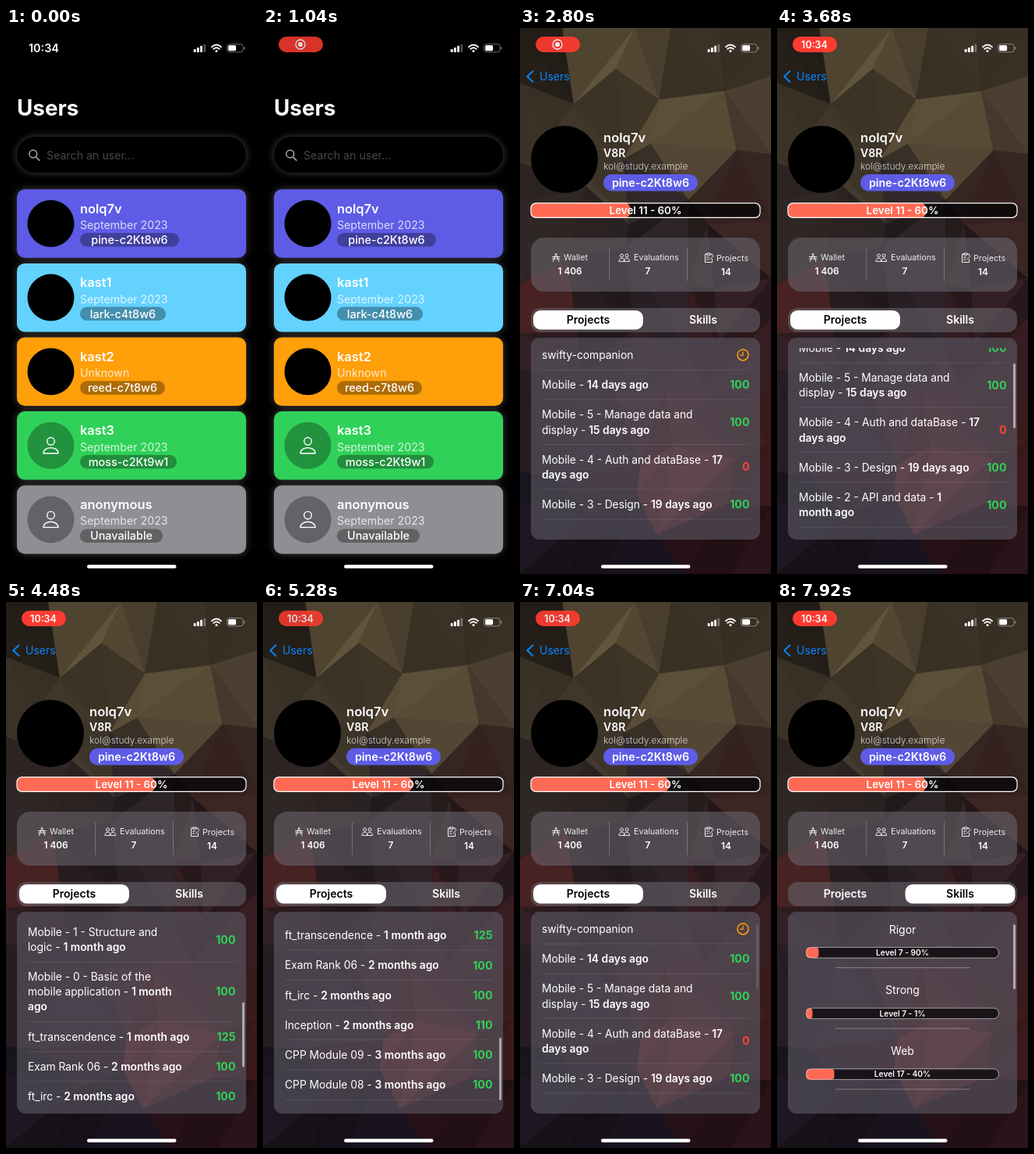
Recreate the animation shown at these times as an HTML page. Size 322 px wide and 698 px high, loop 8 s.

```html
<!DOCTYPE html>
<html lang="en">
<meta charset="utf-8">
<title>Users</title>
<style>
html, body { margin: 0; height: 100%; overflow: hidden; background: #000; }
svg { display: block; width: 322px; height: 698px; font-family: Inter, Roboto, sans-serif; white-space: pre; }
.glow { filter: drop-shadow(0 0 5px rgba(255, 235, 245, .27)); }
</style>
<svg id="stage" viewBox="0 0 322 698"></svg>
<script>
const LOOP = 8000, W = 322, H = 698, SCROLL = 412;
const GREEN = '#30d158', RED = '#ff453a', ORANGE = '#ff9f0a', BLUE = '#0a84ff', INDIGO = '#5e5ce6';

const text = (x, y, size, weight, fill, str, anchor = 'start', more = '') =>
  `<text x="${x}" y="${y}" font-size="${size}" font-weight="${weight}" fill="${fill}" text-anchor="${anchor}" ${more}>${str}</text>`;
const rect = (x, y, w, h, r, fill, more = '') =>
  `<rect x="${x}" y="${y}" width="${w}" height="${h}" rx="${r}" fill="${fill}" ${more}/>`;
const circle = (x, y, r, fill, more = '') => `<circle cx="${x}" cy="${y}" r="${r}" fill="${fill}" ${more}/>`;
const line = (d, color = '#fff', width = 1, more = '') =>
  `<path d="${d}" fill="none" stroke="${color}" stroke-width="${width}" stroke-linecap="round" stroke-linejoin="round" ${more}/>`;

// Users list
const users = [
  ['nolq7v', 'September 2023', 'pine-c2Kt8w6', 127, INDIGO],
  ['kast1', 'September 2023', 'lark-c4t8w6', 110, '#64d2ff'],
  ['kast2', 'Unknown', 'reed-c7t8w6', 109, ORANGE],
  ['kast3', 'September 2023', 'moss-c2Kt9w1', 124, GREEN, true],
  ['anonymous', 'September 2023', 'Unavailable', 106, '#8e8e93', true]
];
const userCard = ([name, date, place, w, color, plain], i) =>
  `<g transform="translate(0 ${i * 94.6})">` +
  rect(14, 206.3, 294, 87.5, 10, color, 'class="glow"') +
  circle(57.5, 250, 30, plain ? 'rgba(0,0,0,.3)' : '#000') +
  (plain ? circle(57.5, 244.5, 4.8, 'none', 'stroke="#fff" stroke-width="1.4"') +
    line('M48 260C48 250.5 67 250.5 67 260Z', '#fff', 1.4) : '') +
  text(95, 236.5, 16.4, 600, '#fff', name) +
  text(95, 257, 14.2, 400, 'rgba(255,255,255,.78)', date) +
  rect(95, 262, w, 17.5, 8.75, 'rgba(0,0,0,.32)') +
  text(95 + w / 2, 276, 14.4, 500, '#fff', place, 'middle') + '</g>';

const listPage = rect(0, 0, W, H, 0, '#000') +
  rect(14, 139, 294, 46, 23, '#000', 'class="glow"') +
  circle(34.8, 161, 4.9, 'none', 'stroke="#98989d" stroke-width="1.7"') + line('M38.5 164.8l4.3 4.3', '#98989d', 1.9) +
  text(52, 167.5, 14.2, 400, '#48464a', 'Search an user...') +
  users.map(userCard).join('');

// Faceted backdrop: jittered triangles tinted by nearby colour anchors
const anchors = ('20,20,29241c 100,30,574b34 165,60,443a2a 250,30,352d23 300,70,40362a 200,115,5c4f38 290,135,483c2f ' +
  '40,110,382f25 85,140,40372a 20,240,2b2422 160,250,272122 300,230,3a2523 15,340,3c1d1d 150,345,241c20 300,340,2a1a1e ' +
  '60,480,241a21 260,430,361b20 200,580,561f23 300,520,351819 20,600,1a141d 160,685,15101a 300,680,2a1419')
  .split(' ').map(s => {
    const [x, y, c] = s.split(',');
    return [+x, +y, [0, 2, 4].map(i => parseInt(c.substr(i, 2), 16))];
  });
let seed = 11;
const rnd = () => (seed = seed * 16807 % 2147483647) / 2147483647;
function facet(pts) {
  const cx = (pts[0][0] + pts[1][0] + pts[2][0]) / 3, cy = (pts[0][1] + pts[1][1] + pts[2][1]) / 3;
  const sum = [0, 0, 0], light = .78 + .44 * rnd();
  let total = 0;
  for (const [x, y, rgb] of anchors) {
    const k = 1 / (((x - cx) ** 2 + (y - cy) ** 2) ** 2 + 1);
    total += k;
    rgb.forEach((v, i) => sum[i] += v * k);
  }
  const fill = `rgb(${sum.map(v => Math.round(v / total * light))})`;
  return `<polygon points="${pts.join(' ')}" fill="${fill}" stroke="${fill}" stroke-width=".6"/>`;
}
function backdrop() {
  const nx = 5, ny = 9, grid = [];
  for (let j = 0; j <= ny; j++) {
    grid.push([]);
    for (let i = 0; i <= nx; i++) {
      const dx = (rnd() - .5) * 52, dy = (rnd() - .5) * 60;
      grid[j].push([i * W / nx + (i % nx ? dx : 0), j * H / ny + (j % ny ? dy : 0)]);
    }
  }
  let out = rect(0, 0, W, H, 0, '#1c171b');
  for (let j = 0; j < ny; j++) for (let i = 0; i < nx; i++) {
    const a = grid[j][i], b = grid[j][i + 1], c = grid[j + 1][i + 1], d = grid[j + 1][i];
    out += rnd() < .5 ? facet([a, b, c]) + facet([a, c, d]) : facet([a, b, d]) + facet([b, c, d]);
  }
  return out;
}

// Project rows: lines of [plain, bold], then the mark
const projects = [
  [[['swifty-companion', '']], ''],
  [[['Mobile - ', '14 days ago']], 100],
  [[['Mobile - 5 - Manage data and', ''], ['display - ', '15 days ago']], 100],
  [[['Mobile - 4 - Auth and dataBase - ', '17'], ['', 'days ago']], 0],
  [[['Mobile - 3 - Design - ', '19 days ago']], 100],
  [[['Mobile - 2 - API and data - ', '1'], ['', 'month ago']], 100],
  [[['Mobile - 1 - Structure and', ''], ['logic - ', '1 month ago']], 100],
  [[['Mobile - 0 - Basic of the', ''], ['mobile application - ', '1 month'], ['', 'ago']], 100],
  [[['ft_transcendence - ', '1 month ago']], 125],
  [[['Exam Rank 06 - ', '2 months ago']], 100],
  [[['ft_irc - ', '2 months ago']], 100],
  [[['Inception - ', '2 months ago']], 110],
  [[['CPP Module 09 - ', '3 months ago']], 100],
  [[['CPP Module 08 - ', '3 months ago']], 100]
];
function projectRows() {
  let y = 398.8, out = '';
  for (const [lines, mark] of projects) {
    const h = 19.1 * (lines.length + 1), mid = y + h / 2;
    lines.forEach(([plain, bold], i) => {
      out += text(28, y + 24.2 + i * 19.1, 13.8, 400, '#fff', `${plain}<tspan font-weight="600">${bold}</tspan>`);
    });
    out += mark === ''
      ? circle(286, mid, 7, 'none', `stroke="${ORANGE}" stroke-width="1.5"`) + line(`M286 ${mid - 4}v4.5h-3.5`, ORANGE, 1.3)
      : text(294.5, mid + 5.2, 14.2, 700, mark ? GREEN : RED, mark, 'end');
    y += h;
    out += line(`M28 ${y}H294`, 'rgba(255,255,255,.12)', .8);
  }
  return out;
}

const skills = [['Rigor', 'Level 7 - 90%', 16], ['Strong', 'Level 7 - 1%', 8], ['Web', 'Level 17 - 40%', 36]];
const skillRow = ([name, level], i) =>
  `<g transform="translate(0 ${i * 77.7})">` +
  text(161, 423.5, 14, 400, '#fff', name, 'middle') +
  rect(37.5, 441.5, 247, 13.5, 6.75, 'rgba(14,10,14,.82)') +
  rect(37.5, 441.5, 8, 13.5, 4, '#ff6a55', 'class="skill"') +
  rect(37.5, 441.5, 247, 13.5, 6.75, 'none', 'stroke="rgba(255,255,255,.6)" stroke-width=".9"') +
  text(161, 451.9, 10.2, 600, '#fff', level, 'middle') +
  line('M75 467.5H247', 'rgba(255,255,255,.4)', .8) + '</g>';

const person = (x, s) => circle(x, 291, 2 * s, 'none', 'stroke="#fff" stroke-width=".9"') +
  line(`M${x - 3.6 * s} 298c0 -5 ${7.2 * s} -5 ${7.2 * s} 0z`, '#fff', .9);
const stat = (x, mid, y, label, value) => text(x, y, 10.7, 400, 'rgba(255,255,255,.9)', label) +
  text(mid, y + 18, 11.8, 600, '#fff', value, 'middle');

const profilePage = backdrop() +
  circle(57, 168, 43, '#000') +
  text(107, 146, 16.6, 600, '#fff', 'nolq7v') +
  text(107, 165, 14, 600, '#fff', 'V8R') +
  text(107, 180.5, 12, 300, 'rgba(255,255,255,.78)', 'kol@study.example') +
  rect(107, 187, 121, 21.5, 10.75, INDIGO) + text(167.5, 203, 14.3, 600, '#fff', 'pine-c2Kt8w6', 'middle') +
  rect(14, 223.8, 294, 18.6, 6.5, 'rgba(8,5,8,.8)') +
  rect(14, 223.8, 9, 18.6, 4.5, '#ff6a55', 'id="level"') +
  rect(14, 223.8, 294, 18.6, 6.5, 'none', 'stroke="#fff" stroke-width="1.2"') +
  text(161, 238, 13.4, 600, '#fff', 'Level 11 - 60%', 'middle') +
  rect(14, 268, 294, 69, 17, 'rgba(108,104,112,.56)') +
  line('M114.5 281.5V323M214.5 281.5V323', 'rgba(255,255,255,.22)') +
  line('M42.5 298.5l3.7 -10.5 3.7 10.5M41.5 292.5h9.4M41.5 295h9.4', '#fff', .9) +
  person(130.5, 1) + person(137, 1) +
  line('M240 289h-2.5v10.5h9v-4M240 288h4v2.2h-4zM244 289h2.5v1.5M239.5 293h3M239.5 296h2M243.5 296l5 -5', '#fff', .9) +
  stat(56, 64, 297, 'Wallet', '1 406') + stat(146, 164, 297, 'Evaluations', '7') + stat(252, 264.5, 297.5, 'Projects', '14') +
  rect(14, 358, 294, 31, 12, 'rgba(104,100,108,.58)') +
  rect(17, 361, 141, 24.5, 9.5, '#fff', 'id="thumb"') +
  text(87.5, 378.3, 14, 600, '#000', 'Projects', 'middle', 'id="tab0"') +
  text(235, 378.3, 14, 600, '#fff', 'Skills', 'middle', 'id="tab1"') +
  rect(14, 396, 294, 258, 11, 'rgba(92,89,100,.62)') +
  `<g clip-path="url(#view)"><g id="rows">${projectRows()}</g></g>` +
  `<g id="skills">${skills.map(skillRow).join('')}</g>` +
  rect(303, 412, 3, 83, 1.5, 'rgba(255,255,255,.55)', 'id="bar"');

const statusBar =
  text(48.5, 31, 14.4, 600, '#fff', '10:34', 'middle', 'id="clock"') +
  '<g id="pill">' + rect(20, 11, 57, 20, 10, '#ff3b30') +
  `<g id="rec">${circle(48, 21, 6, 'none', 'stroke="#fff" stroke-width="1.3"')}${circle(48, 21, 3, '#fff')}</g>` +
  text(48, 25.5, 12.5, 600, '#fff', '10:34', 'middle', 'id="pillClock"') + '</g>' +
  [0, 1, 2, 3].map(i => rect(240.7 + i * 4.2, 27 - i * 2.1, 2.9, 4 + i * 2.1, .8, i < 3 ? '#fff' : 'rgba(255,255,255,.3)')).join('') +
  line('M264 24.2Q270 19 276 24.2M266.3 26.8Q270 23.6 273.7 26.8', '#fff', 1.9) + circle(270, 29.4, 1.5, '#fff') +
  rect(283.6, 20.6, 20.4, 10.2, 3, 'none', 'stroke="rgba(255,255,255,.42)"') +
  rect(285.1, 22.1, 10, 7.2, 1.7, '#fff') + rect(305.1, 24, 1.3, 3.6, .6, 'rgba(255,255,255,.45)') +
  rect(104, 686.3, 114.5, 4.4, 2.2, '#fff');

document.getElementById('stage').innerHTML =
  `<clipPath id="view">${rect(14, 409, 294, 232, 0, '#000')}</clipPath>` +
  `<g id="list">${listPage}</g>` + rect(0, 0, W, H, 0, '#000', 'id="dim"') +
  `<g id="profile">${profilePage}</g>` +
  line('M16.5 55.2L9.3 62l7.2 6.8', BLUE, 2, 'id="back"') +
  text(0, 0, 14, 400, '#fff', 'Users', 'start', 'id="title"') + statusBar;

const el = id => document.getElementById(id);
const set = (id, attrs) => { for (const k in attrs) el(id).setAttribute(k, attrs[k]); };
const ramp = (t, a, b) => Math.min(1, Math.max(0, (t - a) / (b - a)));
const ease = (t, a, b) => { const u = ramp(t, a, b); return u * u * (3 - 2 * u); };
const mix = (a, b, u) => a + (b - a) * u;
const fills = document.querySelectorAll('.skill');

function draw(t) {
  // Recording pill, pulsing gently
  const pill = ramp(t, 480, 720);
  const pulse = Math.max(0, Math.cos((t - 1040) / 2120 * 2 * Math.PI));
  set('clock', { opacity: 1 - pill });
  set('pill', { opacity: pill * (1 - .15 * pulse) });
  const timed = ramp(t, 3300, 3500);
  set('rec', { opacity: 1 - timed });
  set('pillClock', { opacity: timed });

  // Push to the profile
  const s = Math.max(0, t - 1920) * .014;
  const p = s > 9 ? 1 : 1 - (1 + s) * Math.exp(-s);
  set('list', { transform: `translate(${-97 * p} 0)` });
  set('dim', { opacity: .22 * p });
  set('profile', { transform: `translate(${W * (1 - p)} 0)`, visibility: p ? 'visible' : 'hidden' });
  set('back', { opacity: ramp(p, .9, 1), transform: `translate(${60 * (1 - p)} 0)` });
  set('title', {
    x: mix(14, 25, p), y: mix(112, 67, p), 'font-size': mix(27.8, 14, p), 'font-weight': p < .6 ? 700 : 400,
    fill: `rgb(${[10, 132, 255].map(c => Math.round(mix(255, c, Math.min(1, p * 1.2))))})`
  });
  const level = Math.max(9, 177 * ease(t, 2150, 3150));
  set('level', { width: level, rx: Math.min(6.5, level / 2) });

  // Scrolling and tabs
  const y = SCROLL * (ease(t, 3275, 5200) - ease(t, 5340, 6585));
  const tab = ease(t, 7220, 7470), onSkills = t >= 7260;
  const top = onSkills ? 412 : 412 + y / SCROLL * 145;
  set('rows', { transform: `translate(0 ${-y})`, visibility: onSkills ? 'hidden' : 'inherit' });
  set('skills', { visibility: onSkills ? 'inherit' : 'hidden' });
  set('bar', {
    y: top, height: Math.min(83, 637 - top),
    opacity: onSkills ? ramp(t, 7260, 7400) : ramp(t, 3275, 3400) - ramp(t, 6850, 7100)
  });
  set('thumb', { x: mix(17, 164.5, tab) });
  set('tab0', { fill: tab < .5 ? '#000' : '#fff' });
  set('tab1', { fill: tab < .5 ? '#fff' : '#000' });
  fills.forEach((f, i) => f.setAttribute('width', mix(8, skills[i][2], ease(t, 7300, 7900))));
}

const start = performance.now();
function tick() {
  draw((performance.now() - start) % LOOP);
  requestAnimationFrame(tick);
}
draw(0);
requestAnimationFrame(tick);
</script>
</html>
```
